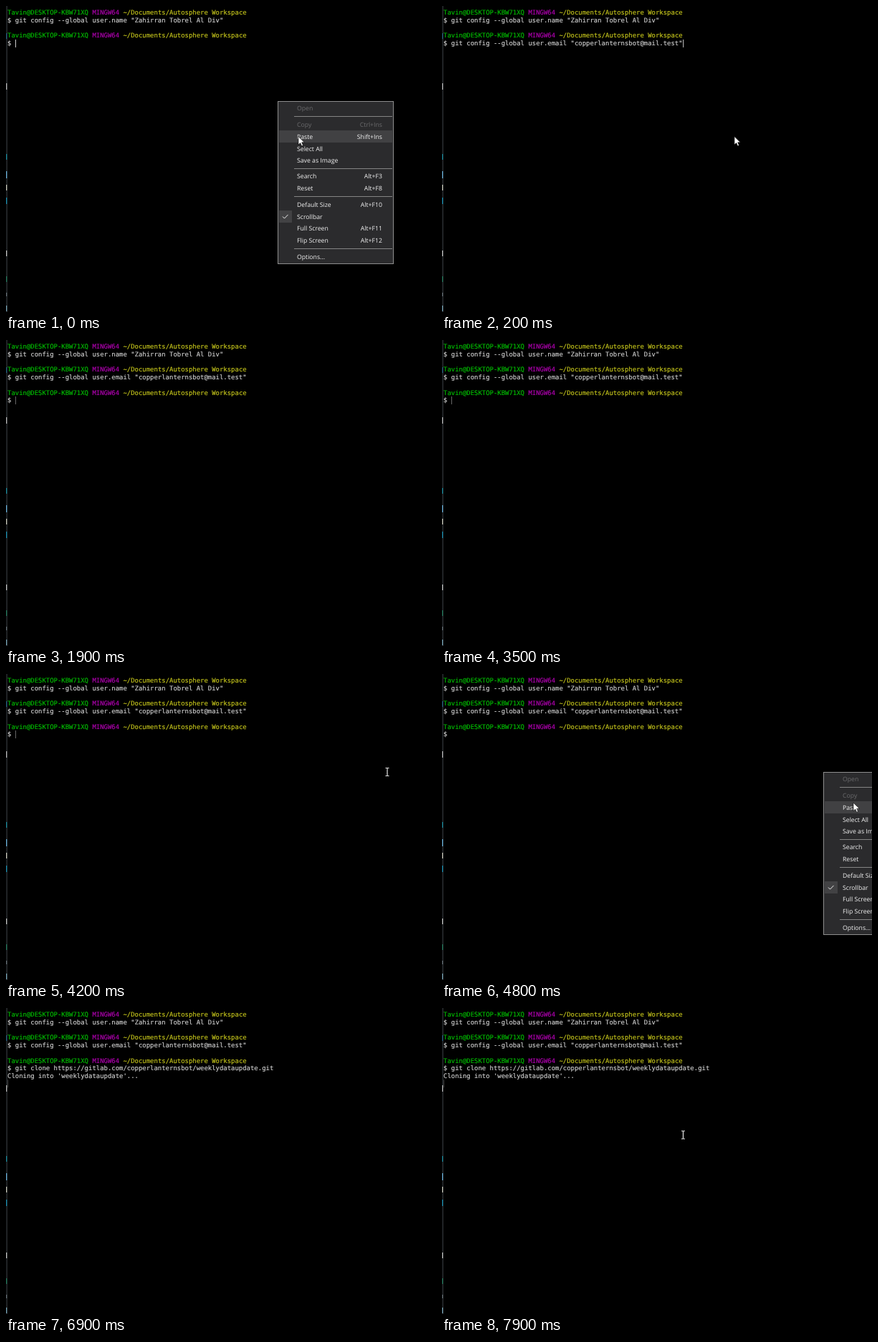
Recreate the animation shown at these times as an HTML page. Size 600 by 428 pixels, loop 8000 ms.

```html
<!DOCTYPE html>
<html lang="en">
<head>
<meta charset="utf-8">
<style>
html, body { margin: 0; width: 100%; height: 100%; overflow: hidden; background: #000; }
svg { display: block; }
text { white-space: pre; text-rendering: geometricPrecision; }
#term { font: 8.95px "DejaVu Sans Mono", monospace; fill: #cfcfcf; stroke: #cfcfcf; stroke-width: .15; }
#menu { font: 8.7px "Open Sans", sans-serif; fill: #f2f2f2; }
.user { fill: #00c000; stroke: #00c000; }
.sys { fill: #b400b4; stroke: #b400b4; }
.path { fill: #c8c81c; stroke: #c8c81c; }
.off { fill: #6b6b6d; }
</style>
</head>
<body>
<svg width="600" height="428" viewBox="0 0 600 428">
  <rect width="600" height="428"/>
  <g id="edge"></g>
  <g id="term"></g>
  <rect id="caret" width="1" height="11" fill="#d0d0d0"/>
  <g id="menu"></g>
  <path id="arrow" d="M0 0V11.5L2.7 9.1L4.6 13.3L6.5 12.4L4.7 8.3H8.3Z" fill="#fff" stroke="#000" stroke-width=".6"/>
  <path id="beam" d="M-2.5 -5.5H-.7L0 -5L.7 -5.5H2.5M0 -5V5M-2.5 5.5H-.7L0 5L.7 5.5H2.5" fill="none" stroke="#e8e8e8" stroke-width="1.2"/>
</svg>
<script>
const LOOP = 8000, TICK = 100, CHAR = 5.388, ROW = 10.7;
const $ = id => document.getElementById(id);
const show = (el, on) => el.setAttribute('visibility', on ? 'visible' : 'hidden');
const move = (el, x, y) => el.setAttribute('transform', `translate(${x} ${y})`);
const rect = (x, y, w, h, fill) => `<rect x="${x}" y="${y}" width="${w}" height="${h}" fill="${fill}"/>`;

// Sliver of the window behind the terminal: [y, height, colour]
const flecks = [[38, 8, '#1c5470'], [108, 9, '#a5a5a5'], [207, 8, '#137c8c'], [231, 10, '#5c9ec4'],
  [250, 8, '#b5b5a8'], [268, 9, '#137f9f'], [342, 8, '#b0b0b0'], [378, 8, '#1c6b50'],
  [401, 5, '#5a6268'], [419, 8, '#6a94a4']];
$('edge').innerHTML = rect(0, 0, 1, 428, '#15191c') + rect(1, 0, 1, 428, '#292b2d') +
  flecks.map(([y, h, c]) => rect(0, y, 1.4, h, c)).join('');

// Terminal rows: [row, time it appears, content]
const prompt = '<tspan class="user">Tavin@DESKTOP-KBW71XQ</tspan> <tspan class="sys">MINGW64</tspan> ' +
  '<tspan class="path">~/Documents/Autosphere Workspace</tspan>';
const emailCmd = 'git config --global user.email "copperlanternsbot@mail.test"';
const cloneCmd = 'git clone https://gitlab.com/copperlanternsbot/weeklydataupdate.git';
const lines = [
  [0, 0, prompt], [1, 0, '$ git config --global user.name "Zahirran Tobrel Al Div"'],
  [3, 0, prompt], [4, 0, '$'], [4, 200, '  ' + emailCmd],
  [6, 500, prompt], [7, 500, '$'], [7, 5000, '  ' + cloneCmd],
  [8, 5400, "Cloning into 'weeklydataupdate'..."]
];
$('term').innerHTML = lines.map(([row, , s]) => `<text x="2" y="${12.3 + row * ROW}">${s}</text>`).join('');

// Caret: [from, column, row, opacity]
const carets = [[0, 2, 4, 1], [200, 2 + emailCmd.length, 4, 1], [500, 2, 7, 1], [1100, 2, 7, .5],
  [4300, 2, 7, 0], [5000, 2 + cloneCmd.length, 7, 1], [5400, 0, 9, 0], [6000, 0, 9, .3]];

// Context menu: [centre y, label, shortcut, disabled]
const items = [[10, 'Open', '', 1], [32.5, 'Copy', 'Ctrl+Ins', 1], [49.5, 'Paste', 'Shift+Ins'],
  [66.5, 'Select All', ''], [83.3, 'Save as Image', ''], [105.3, 'Search', 'Alt+F3'],
  [122.2, 'Reset', 'Alt+F8'], [144.4, 'Default Size', 'Alt+F10'], [161.4, 'Scrollbar', ''],
  [178.3, 'Full Screen', 'Alt+F11'], [195.3, 'Flip Screen', 'Alt+F12'], [217.5, 'Options...', '']];
$('menu').innerHTML =
  '<rect x=".5" y=".5" width="161" height="227" fill="#2b2b2d" stroke="#8e8e8e"/>' +
  rect(2, 41, 158, 17, '#414143') + rect(2, 153, 18, 17, '#424244') +
  [21, 94, 133, 206].map(y => rect(23, y, 137, 1, '#848484')).join('') +
  '<path d="M7 161.5l2.5 2.6l5 -5.2" fill="none" stroke="#eee"/>' +
  items.map(([y, label, key, off]) => `<g class="${off ? 'off' : ''}"><text x="27" y="${y + 3.1}">${label}</text>` +
    `<text x="146" y="${y + 3.1}" text-anchor="end">${key}</text></g>`).join('');

// Pointer: [shape, start, end of motion, hidden at, x0, y0, x1, y1]
const pointers = [
  ['arrow', 0, 1, 800, 408, 182.5, 408, 182.5],
  ['beam', 4000, 4200, 4300, 598, 160, 532, 137],
  ['arrow', 4300, 4700, 5400, 532, 137, 574, 180],
  ['beam', 7200, 7800, LOOP, 552, 205, 336.5, 177.5]
];

function draw(now) {
  const t = Math.floor(now % LOOP / TICK) * TICK;
  lines.forEach(([, from], i) => show($('term').children[i], t >= from));

  const [, col, row, alpha] = carets.findLast(c => t >= c[0]);
  move($('caret'), 2.2 + col * CHAR, 4.1 + row * ROW);
  $('caret').setAttribute('opacity', alpha);

  const late = t >= 4300;
  show($('menu'), t < 200 || late && t < 5000);
  move($('menu'), late ? 532 : 379, late ? 137 : 133);

  show($('arrow'), false);
  show($('beam'), false);
  const p = pointers.find(p => t >= p[1] && t < p[3]);
  if (p) {
    const [shape, start, end, , x0, y0, x1, y1] = p;
    const k = Math.min(1, (t - start) / (end - start)), ease = k * (2 - k);
    show($(shape), true);
    move($(shape), x0 + (x1 - x0) * ease, y0 + (y1 - y0) * ease);
  }
}

const begin = performance.now();
function frame() {
  draw(performance.now() - begin);
  requestAnimationFrame(frame);
}
frame();
</script>
</body>
</html>
```
